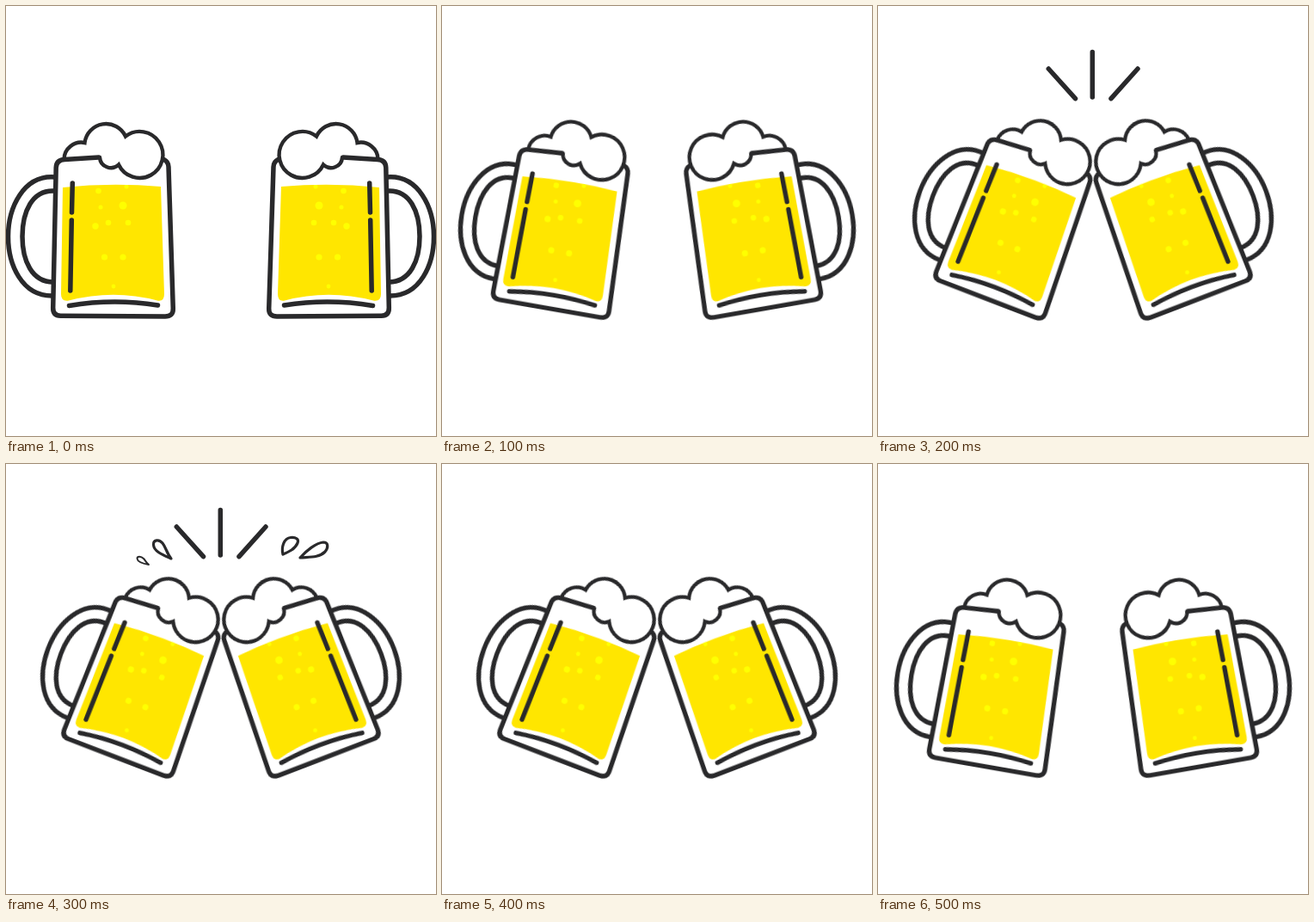
Recreate the animation shown at these times as an HTML page. Size 500x500 px, loop 0.6 s.

```html
<!DOCTYPE html>
<html lang="en">
<head>
<meta charset="utf-8">
<title>Cheers</title>
<style>
  html, body { margin: 0; width: 100%; height: 100%; overflow: hidden; background: #fff; }
  svg { display: block; width: 100%; height: 100%; }

  .line { fill: none; stroke: #29292b; stroke-width: 5.5; stroke-linecap: round; stroke-linejoin: round; }
  .glass { fill: #fff; }
  .foam { fill: #fff; stroke-width: 4.4; stroke-linejoin: miter; }
  .beer { fill: #ffe600; }
  .bubbles { fill: #ff0; }
  .drops { stroke-width: 3.2; }
  .tiny { stroke-width: 2; }

  .mug, .sparks, .drops { animation: 600ms step-end infinite; }
  .mug { transform-origin: 155.5px 173px; animation-name: clink; }
  .sparks { animation-name: flash; }
  .drops { animation-name: splash; }

  @keyframes clink {
    0%, 100% { transform: none; }
    16.666%, 83.333% { transform: translate(30.5px, 3px) rotate(9.6deg) scale(.978); }
    33.333% { transform: translate(65px, 8px) rotate(20.6deg) scale(.972); }
  }
  @keyframes flash {
    0%, 66.666%, 100% { visibility: hidden; }
    33.333% { visibility: visible; }
  }
  @keyframes splash {
    0%, 66.666%, 100% { visibility: hidden; }
    50% { visibility: visible; }
  }
</style>
</head>
<body>
<svg viewBox="0 0 500 500">
  <defs>
    <clipPath id="level">
      <path id="beer" d="M66 211Q122 205 180 210L184 335Q184 344 176 342.500Q125 329 73 342.500Q64 344 64 335Z"/>
    </clipPath>
    <g id="mug">
      <!-- handle -->
      <path class="line" d="M57 199C20 196 2.500 235 2.500 268C2.500 300 18 338 55 337"/>
      <path class="line" d="M57 215C30 213 19 240 19 268C19 296 30 321 55 321"/>

      <path class="glass" d="M58 179L188 179L195 360L55 360Z"/>
      <use class="beer" href="#beer"/>
      <g class="bubbles" clip-path="url(#level)">
        <circle cx="136" cy="232" r="4.500"/>
        <circle cx="107.500" cy="215" r="3.300"/>
        <circle cx="140" cy="210" r="2.500"/>
        <circle cx="110" cy="234" r="2.500"/>
        <circle cx="119" cy="252" r="3.300"/>
        <circle cx="142" cy="252" r="3.300"/>
        <circle cx="104" cy="256" r="3.700"/>
        <circle cx="114.500" cy="292" r="3.600"/>
        <circle cx="136" cy="292" r="3.600"/>
        <circle cx="125" cy="326" r="2.400"/>
      </g>

      <path class="line foam" d="M67.500 178A20 20 0 0 1 91.500 159A25 25 0 0 1 139 151.500A27 27 0 1 1 131 184.500A13 13 0 0 1 109 176"/>
      <path class="line" d="M108 176L68 178.500Q58.500 179 58.200 188L54.700 351Q54.500 360 63.500 360.200L185 361Q194.500 361 194.300 352L189 187Q188.800 181 183.500 178.500"/>

      <!-- shine -->
      <path class="line" d="M77.300 206L76.500 240M76.300 249L74.800 331M73.500 348.500Q125 340 176.500 348"/>
    </g>
  </defs>

  <g class="mug"><use href="#mug"/></g>
  <g transform="matrix(-1 0 0 1 500 0)"><g class="mug"><use href="#mug"/></g></g>

  <path class="line sparks" d="M249.300 53.500V106M198.300 73L229.500 107.700M302 73L271 107.700"/>

  <g class="line drops">
    <path d="M192 110C183 106 172 102 171.500 94C171 88 178 87 182 92C186 97 187 104 192 110Z"/>
    <path class="tiny" d="M166 117C160 116 153 114 152.500 110C152.500 107 157 107 160 110C162 112 163 115 166 117Z"/>
    <path d="M322 105C320 97 323 86 331 85.500C337 85 341 87 339 92C336 99 329 102 322 105Z"/>
    <path d="M342 109C349 101 360 92 369 91C375 91 375 97 371 102C364 109 353 108 342 109Z"/>
  </g>
</svg>
</body>
</html>
```
